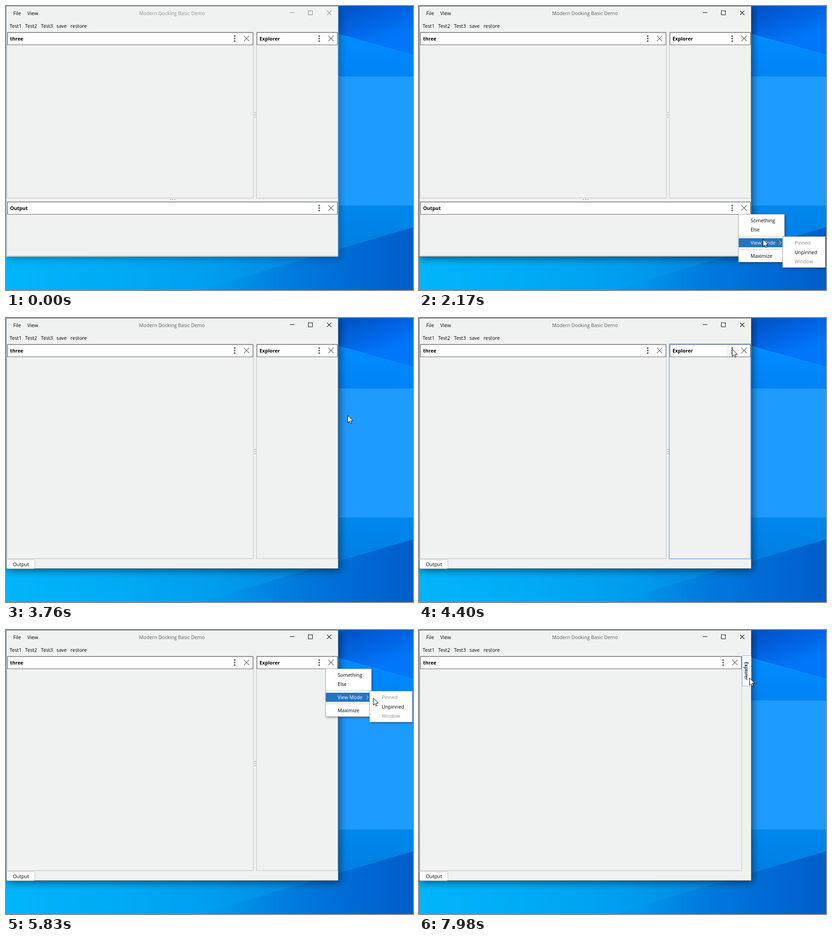
Write an HTML page with a canvas that moves like this. It is 896 px wide and 625 px high and loops after 8000 ms.

```html
<!DOCTYPE html>
<html lang="en">
<head>
<meta charset="utf-8">
<title>Modern Docking Basic Demo</title>
<style>
  html, body { margin: 0; width: 100%; height: 100%; overflow: hidden; background: #0080e8; }
  canvas { display: block; }
</style>
</head>
<body>
<canvas id="stage" width="896" height="625"></canvas>
<script>
const ctx = document.getElementById('stage').getContext('2d');
const LOOP = 8000;
const FACE = '#f0f2f1', ACCENT = '#2675bf', FOCUS = '#8fbce6';

// Pointer path: time, x, y
const PATH = [
  [50, 794, 624], [680, 689, 444], [1110, 689, 444], [1590, 724, 515],
  [1990, 724, 515], [2170, 757, 513], [2350, 795, 503], [2560, 834, 543],
  [3360, 834, 543], [4010, 712, 54], [4190, 712, 54], [4400, 689, 68],
  [4860, 689, 68], [5560, 741, 147], [5730, 741, 147], [5830, 808, 149],
  [6150, 821, 167], [7300, 821, 167], [7700, 694, 112], [7980, 727, 105]
];

// Popup menus: vertical place and the times of each stage
const MENUS = [
  { top: 458, press: 940, open: 1110, leave: 1125, sub: 1800, close: 3000 },
  { top: 85, press: 4550, open: 4680, leave: 4870, sub: 5620, close: 6580 }
];
const OUTPUT_UNPINNED = 3100, EXPLORER_UNPINNED = 6680;

const within = (p, x, y, w, h) => p.x >= x && p.x < x + w && p.y >= y && p.y < y + h;

function pointerAt(t) {
  const next = PATH.findIndex(key => key[0] > t);
  if (next === 0) return { x: 794, y: 660 };
  const [, x, y] = next < 0 ? PATH[PATH.length - 1] : PATH[next - 1];
  if (next < 0) return { x, y };
  const [t0] = PATH[next - 1], [t1, x1, y1] = PATH[next];
  const k = (t - t0) / (t1 - t0), s = k * k * (3 - 2 * k);
  return { x: Math.round(x + (x1 - x) * s), y: Math.round(y + (y1 - y) * s) };
}

function fill(x, y, w, h, color) {
  ctx.fillStyle = color;
  ctx.fillRect(x, y, w, h);
}

function frame(x, y, w, h, color) {
  ctx.strokeStyle = color;
  ctx.lineWidth = 1;
  ctx.strokeRect(x + .5, y + .5, w - 1, h - 1);
}

function label(text, x, middle, color = '#000', weight = 400, size = 10.75) {
  ctx.font = `${weight} ${size}px "Open Sans", "Noto Sans", sans-serif`;
  ctx.fillStyle = color;
  ctx.fillText(text, x, middle + 4);
}

function lines(color, width, ...segments) {
  ctx.strokeStyle = color;
  ctx.lineWidth = width;
  ctx.beginPath();
  for (const [x0, y0, x1, y1] of segments) {
    ctx.moveTo(x0, y0);
    ctx.lineTo(x1, y1);
  }
  ctx.stroke();
}

function cross(x, y, r, color) {
  lines(color, 1.1, [x - r, y - r, x + r, y + r], [x - r, y + r, x + r, y - r]);
}

function polygon(points, paint) {
  ctx.fillStyle = paint;
  ctx.beginPath();
  points.forEach(([x, y]) => ctx.lineTo(x, y));
  ctx.closePath();
  ctx.fill();
}

function gradient(x0, y0, x1, y1, ...colors) {
  const g = ctx.createLinearGradient(x0, y0, x1, y1);
  colors.forEach((c, i) => g.addColorStop(i / (colors.length - 1), c));
  return g;
}

function withShadow(blur, dx, dy, alpha, draw) {
  ctx.save();
  ctx.shadowColor = `rgba(0,0,0,${alpha})`;
  ctx.shadowBlur = blur;
  ctx.shadowOffsetX = dx;
  ctx.shadowOffsetY = dy;
  draw();
  ctx.restore();
}

function drawDesktop() {
  fill(0, 0, 896, 625, gradient(0, 0, 896, 0, '#00b5fb', '#00acf5', '#009eef', '#0086e4', '#0072dc'));
  fill(732, 0, 164, 560, gradient(0, 60, 0, 560, '#008dff', '#0080f4', '#0078ee', '#0088ee', '#007cdf'));
  polygon([[732, 0], [896, 0], [896, 108], [732, 62]], gradient(770, 0, 800, 85, '#0055c6', '#0064e4', '#0076f8'));
  lines('#148fff', 1, [732, 62, 896, 108]);
  polygon([[896, 487], [470, 612], [440, 625], [896, 625]],
    gradient(480, 0, 896, 0, '#0098eb', '#007cde', '#006bd4', '#005dc9'));
  fill(656, 155, 284, 284, '#1e9bff');
}

function drawWindow(active) {
  withShadow(16, 3, 5, active ? .5 : .3, () => fill(0, 0, 732, 551, FACE));
  frame(0, 0, 732, 552, active ? '#3f606f' : '#7b9bad');
  const ink = active ? '#000' : '#858585';
  label('File', 16, 16);
  label('View', 47, 16);
  label('Modern Docking Basic Demo', 293, 16, active ? '#5c5c5c' : '#8f9190');
  lines(ink, 1, [625, 14.5, 635, 14.5]);
  frame(665, 10, 10, 10, ink);
  cross(711.5, 15, 4.7, ink);
  [['Test1', 8], ['Test2', 42], ['Test3', 77], ['save', 111], ['restore', 142]]
    .forEach(([text, x]) => label(text, x, 44));
}

function drawPanel(title, x, y, w, bottom, state = {}) {
  frame(x, y, w, bottom - y, '#bfc1c0');
  if (state.hot) {
    ctx.strokeStyle = FOCUS;
    ctx.lineWidth = 2;
    ctx.strokeRect(x, y, w - 1, bottom - y);
  }
  const right = x + w - 1, middle = y + 15;
  fill(x + 1, y + 1, w - 2, 28, '#fff');
  if (state.button) fill(right - 54, y + 2, 26, 26, state.button);
  frame(x + 1, y + 1, w - 2, 28, '#5f5f5f');
  label(title, x + 7, middle, '#000', 700);
  ctx.fillStyle = '#6b625c';
  for (const dy of [-5.5, 0, 5.5]) {
    ctx.beginPath();
    ctx.arc(right - 40.5, middle - .3 + dy, 1.9, 0, 7);
    ctx.fill();
  }
  cross(right - 14.5, middle - .5, 6, '#666');
}

function drawGrip(x, y, vertical) {
  for (const d of [-5, 0, 5]) fill(x + (vertical ? 0 : d), y + (vertical ? d : 0), 2, 2, '#a6a6a6');
}

function drawTab(x, y, w, h, border) {
  ctx.beginPath();
  ctx.roundRect(x + .5, y + .5, w - 1, h - 1, 2);
  ctx.fillStyle = '#fff';
  ctx.fill();
  ctx.strokeStyle = border;
  ctx.lineWidth = 1;
  ctx.stroke();
}

function drawPanels(t, p) {
  const outputPinned = t < OUTPUT_UNPINNED, explorerPinned = t < EXPLORER_UNPINNED;
  const bottom = outputPinned ? 423 : 530;
  const stateOf = (x, y, w, h, menu) => {
    const hot = within(p, x, y, w, h) && t < menu.leave;
    const over = hot && within(p, 677, y, 26, 30);
    return { hot, button: over && (t >= menu.press ? '#e2e2e2' : '#f5f5f5') };
  };

  drawPanel('three', 2, 57, explorerPinned ? 543 : 709, bottom);
  if (explorerPinned) {
    drawPanel('Explorer', 551, 57, 180, bottom, stateOf(551, 57, 180, bottom - 57, MENUS[1]));
    drawGrip(547, outputPinned ? 239 : 293, true);
  } else {
    drawTab(711, 56, 21, 68, within(p, 711, 56, 21, 68) ? '#7fb0dc' : '#c2c2c2');
    ctx.save();
    ctx.translate(721, 70);
    ctx.rotate(Math.PI / 2);
    label('Explorer', 0, 0, '#000', 600, 9.9);
    ctx.restore();
  }
  if (outputPinned) {
    drawPanel('Output', 2, 430, 729, 550, stateOf(2, 430, 729, 121, MENUS[0]));
    drawGrip(366, 425, false);
  } else {
    drawTab(1, 531, 63, 21, '#c2c2c2');
    label('Output', 15, 542);
  }
}

function popup(x, y, w, h) {
  withShadow(4, 2, 2, .35, () => fill(x, y, w, h, '#fff'));
  frame(x, y, w, h, '#a9a9a9');
}

function drawMenu({ top, open, sub, close }, t, p) {
  if (t < open || t >= close) return;
  const hasSub = t >= sub;
  popup(703, top, 102, 106);
  [['Something', 14], ['Else', 34], ['View Mode', 63], ['Maximize', 92]].forEach(([text, dy]) => {
    const middle = top + dy, isParent = text === 'View Mode';
    const selected = hasSub ? isParent : within(p, 703, middle - 10, 102, 20);
    if (selected) fill(704, middle - 10, 100, 20, ACCENT);
    const ink = selected ? '#fff' : '#000';
    label(text, 730, middle, ink);
    if (isParent) lines(selected ? '#fff' : '#666', 1, [793.5, middle - 4, 797.5, middle], [797.5, middle, 793.5, middle + 4]);
  });
  for (const dy of [48, 77]) fill(704, top + dy, 100, 1, '#cecece');
  if (!hasSub) return;

  popup(800, top + 49, 95, 69);
  [['Pinned', 63], ['Unpinned', 84], ['Window', 104]].forEach(([text, dy]) => {
    const middle = top + dy, enabled = text === 'Unpinned';
    const selected = enabled && within(p, 801, middle - 10, 93, 20);
    if (selected) fill(801, middle - 10, 93, 20, ACCENT);
    label(text, 827, middle, selected ? '#fff' : enabled ? '#000' : '#8c8c8c');
  });
}

function drawPointer({ x, y }) {
  const shape = [[0, 0], [0, 16], [3.7, 12.6], [6, 18], [8.5, 17], [6.2, 11.7], [11.3, 11.5]];
  polygon(shape.map(([dx, dy]) => [x + .5 + dx, y + .5 + dy]), '#fff');
  ctx.strokeStyle = '#000';
  ctx.lineWidth = 1;
  ctx.stroke();
}

function render(now) {
  const t = now % LOOP, p = pointerAt(t);
  drawDesktop();
  drawWindow(t >= MENUS[0].press);
  drawPanels(t, p);
  MENUS.forEach(menu => drawMenu(menu, t, p));
  drawPointer(p);
}

const start = performance.now();
(function tick() {
  render(performance.now() - start);
  requestAnimationFrame(tick);
})();
</script>
</body>
</html>
```
